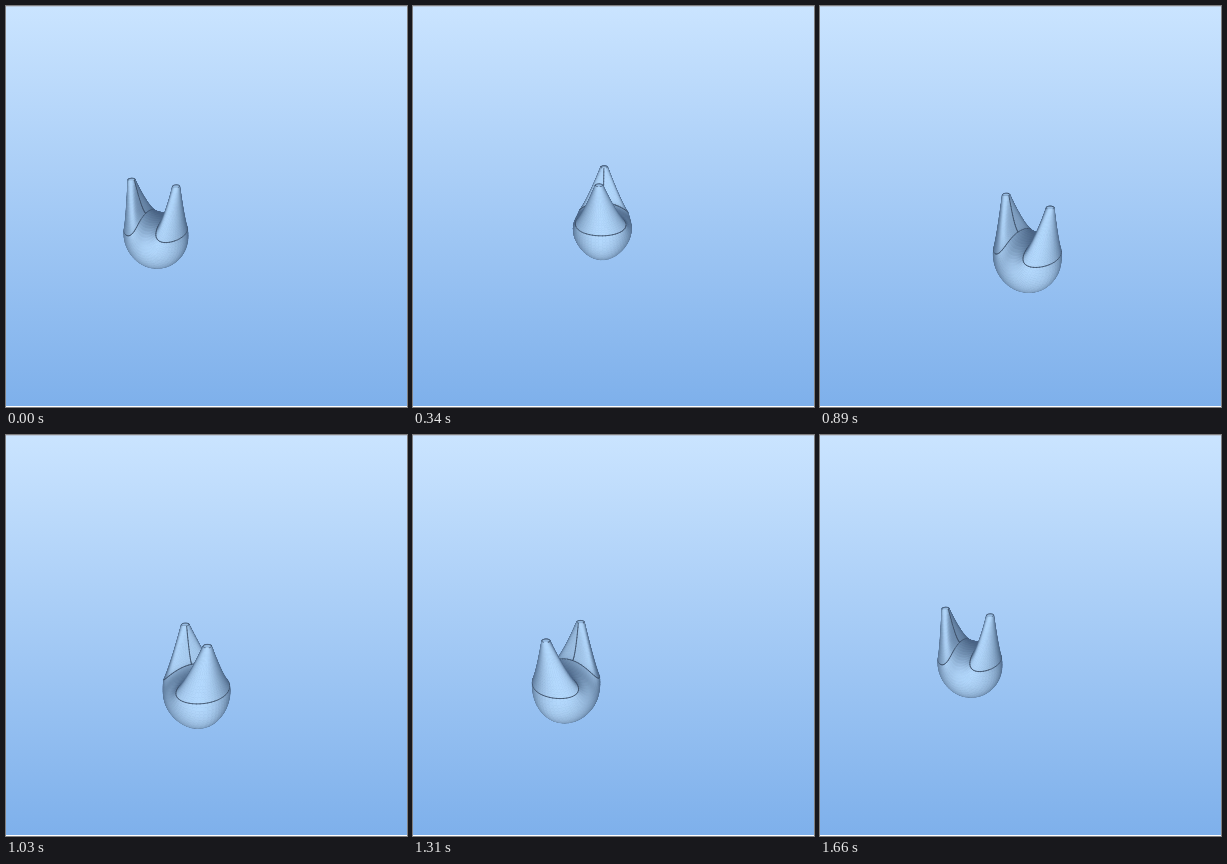
An HTML page with a canvas that plays this animation: 401x401 px, repeating every 1.73 s.

```html
<!DOCTYPE html>
<html lang="en">
<head>
<meta charset="utf-8">
<title>Orbiting horned solid</title>
<style>
  html, body { margin: 0; width: 100%; height: 100%; overflow: hidden; }
  canvas { display: block; }
</style>
</head>
<body>
<canvas id="stage" width="401" height="401"></canvas>
<script>
const ctx = document.getElementById('stage').getContext('2d');
const LOOP = 1730, STEPS = 24, RAD = Math.PI / 180;
const ROWS = 32, COLS = 48;            // ROWS per horn, COLS around each section
const DISTANCE = 500, ORBIT = 36, TILT = 26 * RAD;
const EDGE = 'rgb(58,76,100)', RIM = 'rgb(88,116,150)';

// Control rows from the middle section, over the seam, to the horn tip:
// outer u, z, inner u, z, side u, z, half width
const KEYS = [
  [0, -31, 0, 25, 0, 2, 30.5],
  [33, -31, 6, 25, 9, 2, 30.5],
  [32.3, 11.3, 10.5, 27.5, 15, 15, 26],
  [30, 24, 15, 31.5, 18.5, 27, 17.5],
  [27.3, 62.5, 20.7, 62.5, 24, 62.5, 3.5]
];

function profile(a) {
  const first = a < 0.5 ? 0 : 2, k = 2 * a - first / 2;
  const p = KEYS[0].map((_, i) =>
    (1 - k) ** 2 * KEYS[first][i] + 2 * k * (1 - k) * KEYS[first + 1][i] + k * k * KEYS[first + 2][i]);
  if (!first) {
    const angle = (102 * k - 90) * RAD;
    p[0] = 33 * Math.cos(angle);
    p[1] = 4 + 35 * Math.sin(angle);
  }
  return p;
}

const mesh = [];
for (let i = -ROWS; i <= ROWS; i++) {
  const [ou, oz, iu, iz, su, sz, width] = profile(Math.abs(i) / ROWS);
  const row = [];
  for (let j = 0; j <= COLS; j++) {
    const t = j / COLS * 2 * Math.PI, s = Math.sin(t);
    const blend = (outer, inner, side) =>
      side + (outer - inner) / 2 * s + ((outer + inner) / 2 - side) * s * s;
    row.push([(i < 0 ? -1 : 1) * blend(ou, iu, su), width * Math.cos(t), blend(oz, iz, sz)]);
  }
  mesh.push(row);
}

function camera(angle) {
  const spin = (angle + 20) * RAD, c = Math.cos(spin), s = Math.sin(spin);
  const orbitX = ORBIT * Math.cos((angle - 152) * RAD);
  const orbitZ = -ORBIT * Math.cos((angle - 62) * RAD);
  return ([u, v, z]) => {
    const front = u * s + v * c + orbitZ;
    const x = -20 + orbitX + u * c - v * s;
    const y = 40.6 + front * Math.sin(TILT) - z * Math.cos(TILT);
    const depth = front * Math.cos(TILT) + z * Math.sin(TILT);
    const scale = DISTANCE / (DISTANCE - depth);
    return { x, y, depth, px: 200.5 + x * scale, py: 200.5 + y * scale };
  };
}

function shade(a, b, c, d) {
  const p = [c.x - a.x, c.y - a.y, c.depth - a.depth];
  const q = [d.x - b.x, d.y - b.y, d.depth - b.depth];
  const n = [p[1] * q[2] - p[2] * q[1], p[2] * q[0] - p[0] * q[2], p[0] * q[1] - p[1] * q[0]];
  const light = (0.28 * n[1] + 0.96 * n[2]) / (Math.hypot(...n) || 1);
  const v = Math.max(0, light) ** 1.2;
  const mix = (dark, bright) => Math.round(dark + (bright - dark) * v);
  return `rgb(${mix(76, 180)},${mix(102, 217)},${mix(134, 253)})`;
}

function background() {
  const sky = ctx.createLinearGradient(0, 0, 0, 401);
  sky.addColorStop(0, 'rgb(202,228,255)');
  sky.addColorStop(1, 'rgb(126,176,235)');
  ctx.fillStyle = sky;
  ctx.fillRect(0, 0, 401, 401);
  ctx.fillStyle = 'rgb(186,201,220)';
  ctx.fillRect(0, 0, 401, 1);
  ctx.fillStyle = '#fff';
  ctx.fillRect(0, 400, 401, 1);
}

function draw(step) {
  background();
  const view = mesh.map(row => row.map(camera(step * 360 / STEPS)));
  const parts = [];
  const add = (points, fill, stroke, width, bias = 0) => parts.push({
    points, fill, stroke, width,
    depth: points.reduce((sum, p) => sum + p.depth, 0) / points.length + bias
  });
  const line = (a, b) => add([a, b], null, EDGE, 0.85, 2);

  for (let i = 0; i < 2 * ROWS; i++) {
    for (let j = 0; j < COLS; j++) {
      const quad = [view[i][j], view[i + 1][j], view[i + 1][j + 1], view[i][j + 1]];
      const [a, b, c, d] = quad;
      const area = (c.px - a.px) * (d.py - b.py) - (c.py - a.py) * (d.px - b.px);
      if (area > 0) {
        const color = shade(a, b, c, d);
        add(quad, color, color, 0.6);
      } else {
        add(quad, RIM, RIM, 0.7);
      }
    }
  }
  for (const i of [ROWS / 2, ROWS * 3 / 2]) {
    for (let j = 0; j < COLS; j++) line(view[i][j], view[i][j + 1]);
  }
  const inner = COLS * 3 / 4;
  for (let i = 0; i < ROWS / 2; i++) {
    line(view[i][inner], view[i + 1][inner]);
    line(view[2 * ROWS - i][inner], view[2 * ROWS - i - 1][inner]);
  }
  for (const i of [0, 2 * ROWS]) add(view[i], 'rgb(150,186,224)', EDGE, 0.8, 2);

  parts.sort((a, b) => a.depth - b.depth);
  ctx.lineJoin = ctx.lineCap = 'round';
  for (const { points, fill, stroke, width } of parts) {
    ctx.beginPath();
    points.forEach(p => ctx.lineTo(p.px, p.py));
    if (fill) {
      ctx.closePath();
      ctx.fillStyle = fill;
      ctx.fill();
    }
    ctx.strokeStyle = stroke;
    ctx.lineWidth = width;
    ctx.stroke();
  }
}

// Steps last 70 ms, apart from two of 60 ms
function stepAt(t) {
  return Math.floor((t + 10 * (t >= 200) + 10 * (t >= 470)) / 70);
}

let shown = -1;
function tick() {
  const step = stepAt(performance.now() % LOOP);
  if (step !== shown) draw(shown = step);
  requestAnimationFrame(tick);
}
tick();
</script>
</body>
</html>
```
